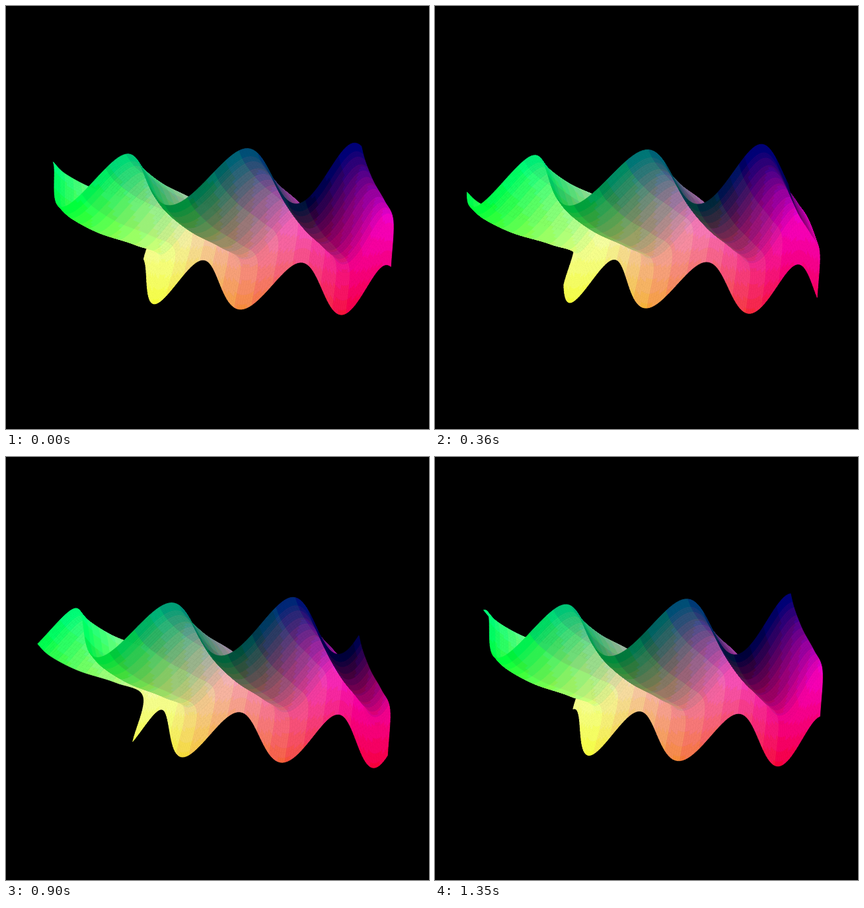
An HTML page with a canvas for the animation above (1.38 s loop, 640 by 640 pixels).

```html
<!DOCTYPE html>
<html lang="en">
<head>
<meta charset="utf-8">
<title>Wave sheet</title>
<style>
html, body { margin: 0; width: 100%; height: 100%; overflow: hidden; background: #000; }
canvas { display: block; width: 640px; height: 640px; }
</style>
</head>
<body>
<canvas id="stage" width="640" height="640"></canvas>
<script>
const ctx = document.getElementById('stage').getContext('2d');
const LOOP = 1380, STEP = 30, PERIOD = 1478;
const COLS = 132, ROWS = 50, TAU = Math.PI * 2;

// Cross-section of the sheet from the near edge to the far edge.
const DEPTH = [0, 0.13, 0.38, 0.70, 0.96, 1];
const LIFT = [0, 1, 16, 45, 62, 0];

const mix = (a, b, k) => a + (b - a) * k;

function spline(pts, v) {
  const n = pts.length - 1;
  const i = Math.min(n - 1, Math.floor(v * n));
  const k = v * n - i;
  const p1 = pts[i], p2 = pts[i + 1];
  const p0 = i ? pts[i - 1] : p1;
  const p3 = i + 2 <= n ? pts[i + 2] : 2 * p2 - p1;
  const m1 = (p2 - p0) / 2, m2 = (p3 - p1) / 2;
  const d = p2 - p1;
  return p1 + k * (m1 + k * (3 * d - 2 * m1 - m2 + k * (m1 + m2 - 2 * d)));
}

const bend = (u, a, b) => a * Math.sin(TAU * u) + b * Math.sin(Math.PI * u);

// Resting position and upward direction at each grid point.
const rest = [];
for (let j = 0; j <= ROWS; j++) {
  const v = j / ROWS, a = spline(DEPTH, v), lift = spline(LIFT, v);
  for (let i = 0; i <= COLS; i++) {
    const u = i / COLS;
    const ux = mix(18.5 - 15.5 * u, 11.5 - 8 * u, a);
    const uy = -mix(37 + 8.7 * u, 33.2 + 6.8 * u, a);
    const x = mix(55 + 480 * u - bend(u, 16, 21.5), 197.5 + 381.5 * u - bend(u, 14.5, 17.5), a);
    const y = mix(268.5 - 16.2 * u, 414 + 17.7 * u, a);
    const turn = 3 * u + 0.008 - 0.02 * a;
    rest.push({ x: x - ux / uy * lift, y: y - lift, ux, uy, lift, turn });
  }
}

const level = (c, size, top = 255) =>
  Math.max(0, Math.min(top, Math.round(Math.round(c / size) * size)));

function paint(t) {
  const lag = t < 660 ? 0.014 * Math.sin(Math.PI * t / 660) : 0;
  const phase = t / PERIOD + 0.07 - lag;
  const points = rest.map(p => {
    const h = Math.cos(TAU * (p.turn + phase));
    return { x: p.x + p.ux * h, y: p.y + p.uy * h, z: 32 * h + 1.1 * p.lift };
  });

  ctx.fillStyle = '#000';
  ctx.fillRect(0, 0, 640, 640);
  ctx.lineWidth = 0.8;
  ctx.lineJoin = 'round';

  for (let j = ROWS - 1; j >= 0; j--) {
    const v = (j + 0.5) / ROWS;
    const red = level(345 * v - 32, 22, 247);
    for (let i = 0; i < COLS; i++) {
      const u = (i + 0.5) / COLS;
      const k = j * (COLS + 1) + i;
      const a = points[k], b = points[k + 1];
      const c = points[k + COLS + 2], d = points[k + COLS + 1];
      const green = level(323 - 375 * u, 20);
      const blue = level(93 + a.z, 20);
      ctx.fillStyle = ctx.strokeStyle = `rgb(${red},${green},${blue})`;
      ctx.beginPath();
      ctx.moveTo(a.x, a.y);
      ctx.lineTo(b.x, b.y);
      ctx.lineTo(c.x, c.y);
      ctx.lineTo(d.x, d.y);
      ctx.closePath();
      ctx.fill();
      ctx.stroke();
    }
  }
}

let shown = -1;
function tick() {
  const t = Math.floor(performance.now() % LOOP / STEP) * STEP;
  if (t !== shown) paint(shown = t);
  requestAnimationFrame(tick);
}
tick();
</script>
</body>
</html>
```
